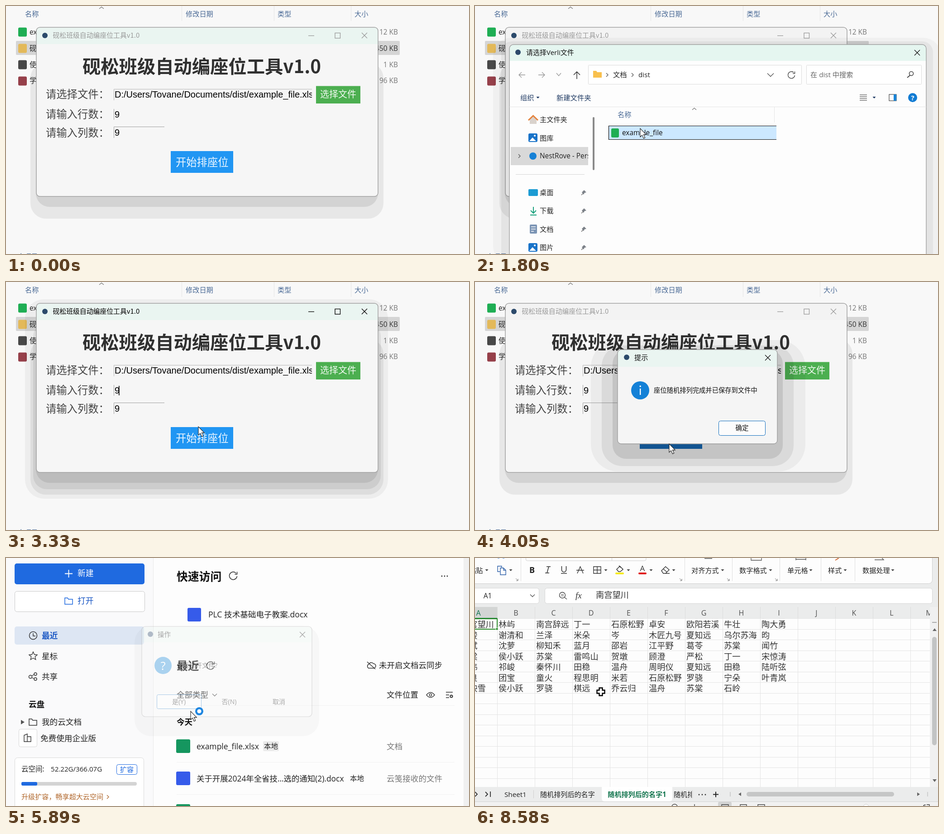
An HTML page that plays this animation: 1023 px wide and 547 px high, repeating every 8620 ms.

```html
<!DOCTYPE html>
<html lang="zh-CN">
<head>
<meta charset="utf-8">
<title>排座位演示</title>
<style>
html,body{margin:0;width:100%;height:100%;overflow:hidden;background:#f8f8f8}
#stage{display:block;width:100vw;height:100vh}
text{font-family:"Open Sans","Noto Sans CJK SC","Noto Sans CJK",sans-serif;white-space:pre}
.b{font-weight:700}
.cjk{font-family:"Noto Sans CJK SC","Noto Sans CJK",sans-serif}
.song{font-family:"Liberation Serif","Noto Sans CJK SC","Noto Sans CJK",serif;font-weight:300}
.arial{font-family:"Liberation Sans",Arial,sans-serif}
.mid{text-anchor:middle}
.end{text-anchor:end}
</style>
</head>
<body>
<svg id="stage" viewBox="0 0 1023 547" preserveAspectRatio="none"></svg>
<script>
const LOOP = 8620;
const APP = '砚松班级自动编座位工具v1.0';

// Drawing helpers, each returns markup
const rect = (x, y, w, h, fill, a = '') => `<rect x="${x}" y="${y}" width="${w}" height="${h}" fill="${fill}" ${a}/>`;
const text = (x, y, s, size = 15.2, fill = '#222', cls = '') => `<text x="${x}" y="${y}" font-size="${size}" fill="${fill}" class="${cls}">${s}</text>`;
const line = (d, c = '#444', w = 1.3, fill = 'none') => `<path d="${d}" stroke="${c}" stroke-width="${w}" fill="${fill}"/>`;
const dot = (x, y, r, fill, a = '') => `<circle cx="${x}" cy="${y}" r="${r}" fill="${fill}" ${a}/>`;
const group = (id, s) => `<g id="${id}">${s}</g>`;
const clip = (x, y, w, h, s) => `<svg x="${x}" y="${y}" width="${w}" height="${h}" viewBox="${x} ${y} ${w} ${h}">${s}</svg>`;
const box = (x, y, w, h, r, stroke, fill = '#fff') => rect(x + .5, y + .5, w - 1, h - 1, fill, `rx="${r}" stroke="${stroke}"`);
const drop = (x, y, c = '#444') => `<path d="M${x - 3.5} ${y - 2}h7l-3.5 4z" fill="${c}"/>`;
const chev = (x, y, w = 5, h = 3, c = '#555') => line(`M${x - w} ${y - h}L${x} ${y + h}L${x + w} ${y - h}`, c);
const next = (x, y, c = '#555') => line(`M${x - 2} ${y - 4}l4 4l-4 4`, c);
const cross = (x, y, c = '#111', r = 6) => line(`M${x - r} ${y - r}l${2 * r} ${2 * r}m0 ${-2 * r}l${-2 * r} ${2 * r}`, c);
const redo = (x, y, r, c = '#333') => line(`M${x + r * .7} ${y - r * .7}A${r} ${r} 0 1 0 ${x + r} ${y + 1}M${x + r} ${y - r}v${r * .6}h${-r * .6}`, c, 1.6);
const shade = (x, y, w, h, r, a) => rect(x, y, w, h, '#000', `rx="${r}" opacity="${a}"`);
const folder = (x, y, c) => line(`M${x} ${y}h6l2 3h9v11h-17z`, c, 1.5);
const each = (list, f) => list.map(f).join('');
const range = (n, f) => Array.from({length: n}, (_, i) => f(i)).join('');

function explorer() {
  const head = '#4a6a96';
  const icons = ['#1fae54', '#e3b95a', '#484848', '#96404a'];
  const names = ['example_file', '砚松', '使用说明', '学生'];
  const sizes = ['12 KB', '450 KB', '1 KB', '96 KB'];
  return rect(0, 0, 1023, 547, '#f8f8f8') +
    each([[42, '名称'], [397, '修改日期'], [600, '类型'], [770, '大小']], ([x, s]) => text(x, 23, s, 15.2, head)) +
    each([388, 592, 762], x => rect(x, 0, 1, 33, '#e4e4e4')) +
    line('M206 6l5-4l5 4', '#777') +
    rect(22, 77, 848, 31, '#d5d5d5', 'rx="2"') +
    range(4, i => rect(27, 47.5 + 36 * i, 19, 20, icons[i], 'rx="3"') +
      text(52, 63 + 35.8 * i, names[i], 15.4) +
      text(866, 63 + 35.8 * i, sizes[i], 15.4, i == 1 ? '#333' : '#777', 'end')) +
    text(13, 558, '4 个项目', 15, head);
}

const controls = c => line('M668 65.5h13', c) + rect(727, 59.5, 11.5, 11.5, 'none', `stroke="${c}" stroke-width="1.3"`) + cross(792, 65, c);

function mainWindow() {
  const cap = c => text(103.5, 70, APP, 14.85, c, 'cjk') + controls(c);
  const top = 'M67.5 84V55a8 8 0 0 1 8-8H814a8 8 0 0 1 8 8V84z';
  const label = (y, s) => text(88, y, s, 23.3, '#444', 'song');
  return shade(54, 125, 780, 344, 34, .07) + shade(66, 300, 756, 143, 30, .085) +
    group('glow', shade(42, 38, 802, 440, 42, .045) + shade(60, 90, 768, 367, 30, .07)) +
    rect(67, 47, 755, 373, '#f6f6f6', 'rx="8"') +
    `<path d="${top}" fill="#f3f3f3"/>` +
    group('mint', `<path d="${top}" fill="#eaf5f1"/>`) +
    cap('#999') + group('ink', cap('#111')) +
    dot(86, 65, 6, '#2c4a6b') +
    rect(67, 47, 755, 373, 'none', 'rx="8" stroke="#a3a3a3" stroke-width="1.5"') +
    text(169, 148, APP, 40.3, '#303030', 'b cjk') +
    label(203, '请选择文件：') + label(247, '请输入行数：') + label(288, '请输入列数：') +
    line('M238.5 208V183.5H676', '#b5b5b5', 1) + line('M238.5 251V227', '#a0a0a0', 1) + line('M238.5 291V266.5H350', '#a0a0a0', 1) +
    clip(238, 184, 438, 24, text(240, 202, 'D:/Users/Tovane/Documents/dist/example_file.xlsx', 20, '#000', 'arial')) +
    text(240, 246, '9', 20, '#000', 'arial') + text(240, 286, '9', 20, '#000', 'arial') +
    group('caret', rect(249, 229, 1.6, 21, '#000')) +
    rect(685, 176.5, 98, 38.5, '#4caf50') + text(694, 202, '选择文件', 20, '#f3faf3', 'song') +
    rect(364, 320, 138, 48, '#2196f3') + group('pressed', rect(364, 320, 138, 48, '#1769b5')) +
    text(375, 353, '开始排座位', 23.3, '#eef7ff', 'song');
}

function fileDialog() {
  const pic = (x, y) => rect(x, y, 20, 19, '#1873c9', 'rx="3"') + `<path d="M${x + 2} ${y + 17}l7-8l8 8z" fill="#fff"/>` + dot(x + 14, y + 5, 2, '#fff');
  const pin = y => line(`M235 ${y + 5}l4-4`, '#777', 1.5) + `<path d="M236 ${y - 1}l5-5l5 5l-4 1l-2 4z" fill="#7b8087"/>`;
  const nav = '#1f3a63';
  const places = ['桌面', '下载', '文档', '图片'];
  return shade(40, 70, 990, 500, 40, .03) + shade(58, 78, 954, 500, 24, .05) +
    rect(76, 85, 921, 480, '#fdfdfd', 'rx="9"') +
    '<path d="M76 121V94a9 9 0 0 1 9-9H988a9 9 0 0 1 9 9V121z" fill="#e5f6f0"/>' +
    rect(76, 85, 921, 480, 'none', 'rx="9" stroke="#a0a0a0" stroke-width="1.4"') +
    dot(95, 102, 6, '#2c4a6b') + text(113, 108, '请选择Verli文件', 15, '#111') + cross(977, 103) +
    line('M111 152H97m6-6l-6 6l6 6M140 152h14m-6-6l6 6l-6 6', '#999') + chev(185, 151, 5, 3, '#999') +
    line('M225 161V145m-7 7l7-7l7 7', '#333', 1.5) +
    box(250, 130, 472, 43, 1, '#dadada') + box(732, 130, 255, 43, 1, '#dadada') +
    '<path d="M261 143h7l2 3h10v12h-19z" fill="#f8c04e"/>' + next(292, 152) + text(305, 157, '文档') + next(348, 152) + text(361, 157, 'dist') +
    chev(653, 152, 7, 3.5) + redo(699, 152, 7.5, '#555') + text(741, 157, '在 dist 中搜索', 15.2, '#666') +
    dot(964, 149, 4.5, 'none', 'stroke="#444" stroke-width="1.6"') + line('M961 153l-6 5', '#444', 1.8) +
    text(100, 208, '组织', 15.2, nav) + drop(139, 202, nav) + text(180, 208, '新建文件夹', 15.3, nav) +
    line('M850 196h16m-16 4h16m-16 4h16m-16 4h16', '#333', 1.2) + drop(882, 202, nav) +
    rect(915, 195, 16, 14, '#fff', 'stroke="#222"') + rect(925, 195, 6, 14, '#1b86d8') +
    dot(967, 202, 10, '#107bd3') + text(967, 207.5, '?', 15, '#fff', 'mid b') +
    rect(76, 222, 921, 1, '#e6e6e6') +
    '<path d="M121 250v10h15v-10l-8-7z" fill="#d9d2cc"/>' + line('M118 252l10.5-10l10.5 10', '#e5823c', 3) + text(143, 256, '主文件夹') +
    pic(118, 281) + text(143, 297, '图库') +
    rect(79, 311, 171, 40, '#d9d9d9') + next(98, 331) + dot(128, 331, 8, '#1681d6') +
    clip(143, 311, 107, 40, text(143, 336, 'NestRove - Personal', 15.4)) +
    rect(260, 245, 4, 117, '#8a8a8a', 'rx="2"') + rect(90, 371, 152, 1, '#d5d5d5') +
    rect(118, 404, 21, 15, '#1c9bd3', 'rx="2"') + line('M129 443v14m-6-6l6 6l6-6M122 461h14', '#18a07c', 2) +
    rect(121, 482, 16, 20, '#7c95b5', 'rx="2"') + line('M124 487h10m-10 5h10m-10 5h6', '#fff', 1.5) + pic(118, 523) +
    each(places, (s, i) => text(143, 417 + 40.4 * i, s) + pin(412 + 40.3 * i)) +
    text(315, 245, '名称', 15.2, '#4a6a96') + line('M480 229l4.5-4l4.5 4', '#777') + rect(661, 223, 1, 34, '#e4e4e4') +
    group('picked', rect(295, 264, 371, 31, '#cce8ff') + line('M666 264.5H295.5V294.5H666', '#111', 1.2)) +
    rect(301, 270, 17, 20, '#1fae54', 'rx="3"') + text(325, 285, 'example_file', 15.4, '#111');
}

function messageBox() {
  return shade(256, 128, 474, 290, 60, .045) + shade(280, 140, 424, 266, 45, .07) + shade(304, 150, 376, 240, 30, .1) +
    rect(315, 149, 353, 208, '#f5f5f5', 'rx="8"') +
    '<path d="M315 187V157a8 8 0 0 1 8-8H660a8 8 0 0 1 8 8V187z" fill="#eaf5f1"/>' +
    rect(315, 149, 353, 208, 'none', 'rx="8" stroke="#9b9b9b" stroke-width="1.3"') +
    dot(335, 166, 6, '#2c4a6b') + text(352, 172, '提示', 15.2, '#111') + cross(647, 167) +
    dot(365, 239, 20, '#1481d7') + rect(364, 235, 2.4, 14, '#fff') + dot(365.2, 230, 1.8, '#fff') +
    text(395, 244, '座位随机排列完成并已保存到文件中', 14.3, '#111') +
    box(538, 306, 104, 33, 4, '#0f6cbd', '#fcfcfc') + text(590, 327, '确定', 14.5, '#111', 'mid');
}

function askBox() {
  return shade(284, 150, 408, 243, 36, .07) +
    rect(300, 151, 376, 199, '#f7f7f7', 'rx="8" stroke="#9b9b9b" stroke-width="1.2"') +
    '<path d="M301 186V159a8 8 0 0 1 8-7H667a8 8 0 0 1 8 7V186z" fill="#eaf5f1"/>' +
    dot(319, 168, 6, '#2c4a6b') + text(335, 174, '操作', 14.6, '#111') + cross(655, 169) +
    dot(347, 237, 19, '#1786d8') + text(347, 247, '?', 26, '#fff', 'mid') +
    text(377, 242, '是否打开文件?', 14, '#111') +
    box(333, 301, 99, 32, 3, '#0f6cbd', '#fcfcfc') +
    each([[382, '是(Y)'], [493, '否(N)'], [603, '取消']], ([x, s]) => text(x, 322, s, 14, '#111', 'mid'));
}

function home() {
  const blue = '#1f6ae0', z = 17.6;
  return rect(0, 0, 1023, 547, '#fdfdfd') + rect(0, 0, 326, 547, '#fafafb') + rect(325, 0, 1, 547, '#e8e8e8') + rect(1011, 0, 12, 547, '#f0f0f0') +
    rect(19, 12, 287, 46, blue, 'rx="5"') + line('M130 34.5h17m-8.5-8.5v17', '#fff', 1.8) + text(158, 40, '新建', 17.8, '#fff') +
    box(19, 73, 288, 46, 5, '#c9c9c9') + folder(130, 88, blue) + text(158, 101, '打开', 17.8, '#1a57c4') +
    rect(19, 151, 286, 40, '#dde6f3', 'rx="5"') + dot(60, 171, 8.5, 'none', 'stroke="#333" stroke-width="1.5"') + line('M60 166v6h5', '#333', 1.5) +
    text(79, 178, '最近', 17.8, '#1a57c4', 'b') +
    line('M60 207l2.7 6l6.3 .6l-4.8 4.2l1.5 6.2l-5.7-3.3l-5.7 3.3l1.5-6.2l-4.8-4.2l6.3-.6z', '#333', 1.4) + text(79, 223, '星标', z) +
    each([[54, 262, 3.5], [65, 256, 3], [65, 267, 3]], a => dot(...a, 'none', 'stroke="#333" stroke-width="1.5"')) + line('M57 260l5-3m-5 7l5 2', '#333') + text(79, 268, '共享', z) +
    text(50, 329, '云盘', 17.6, '#111', 'b') +
    '<path d="M33 357l8 5l-8 5z" fill="#555"/>' + folder(51, 355, '#333') + text(79, 368, '我的云文档', z) +
    box(28, 377, 41, 40, 4, '#d6d6d6') + line('M40 405V391l7-3v17zM47 394h8v11h-8', '#333', 1.4) + text(76, 404, '免费使用企业版', z) +
    box(19, 440, 286, 130, 6, '#d9d9d9') + text(34, 471, '云空间:', 15.5) + text(99, 471, '52.22G/366.07G', 15.1) +
    box(244, 455, 46, 23, 4, blue) + text(267, 472, '扩容', 15.2, blue, 'mid') +
    rect(34, 494, 255, 8, '#d4d4d4', 'rx="4"') + rect(34, 494, 35, 8, blue, 'rx="3"') +
    text(34, 532, '升级扩容，畅享超大云空间', 15.1, '#b0662a') + next(225, 527, '#b0662a') +
    text(377, 50, '快速访问', 24.8, '#111', 'b') + redo(502, 39, 8.5) + each([963, 969, 975], x => dot(x, 40, 1.4, '#333')) +
    rect(401, 110, 30, 30, '#365bea', 'rx="3"') + text(447, 131, 'PLC 技术基础电子教案.docx', z) +
    text(377, 247, '最近', 24.8, '#111', 'b') + redo(452, 237, 8.5) +
    line('M801 243a5 5 0 0 1 1-9a6 6 0 0 1 10-1a5 5 0 0 1 0 10zM798 229l18 16', '#333', 1.5) + text(824, 243, '未开启文档云同步', 17.5) +
    text(377, 308, '全部类型', 17.5) + chev(461, 302, 5, 2.5) + text(841, 308, '文件位置', 17.5) +
    line('M929 302q9-11 18 0q-9 11-18 0z', '#333', 1.4) + dot(938, 302, 2.6, 'none', 'stroke="#333" stroke-width="1.4"') +
    line('M972 296h15m-15 6h7m-7 6h7', '#333', 1.5) + dot(984, 305, 2.6, 'none', 'stroke="#333" stroke-width="2"') +
    text(377, 368, '今天', 17.5, '#111', 'b') +
    each([325, 450, 521], y => rect(377, y, 614, 1, '#f1f1f1')) +
    rect(376, 400, 31, 30, '#15965f', 'rx="3"') + text(421, 422, 'example_file.xlsx', 17.5) +
    rect(568, 404, 35, 22, '#ebebeb', 'rx="3"') + text(570, 421, '本地', 15.5) + text(841, 422, '文档', z, '#777') +
    rect(376, 471, 31, 30, '#365bea', 'rx="3"') + text(421, 493, '关于开展2024年全省技…选的通知(2).docx', 17.4) +
    text(760, 492, '本地', 15.5) + text(841, 493, '云笺接收的文件', z, '#777') + rect(376, 543, 31, 20, '#15965f', 'rx="3"');
}

const ROW = 23.5, GREEN = '#12754e', INK = '#333';

// Ribbon, formula bar, scroll bars and status bar shared by both sheets
function chrome(cell, value, thumb) {
  const tools = [[478, '对齐方式', 547], [584, '数字格式', 653], [690, '单元格', 742], [780, '样式', 818], [856, '数据处理', 923]];
  return rect(0, 0, 1023, 547, '#ebecec') + box(-10, -10, 1021, 67, 8, '#cfcfcf', '#fdfdfd') +
    text(-13, 33, '粘贴') + drop(26, 27) + line('M55 30h-5V18h9v3M56 22h7l5 5v10H56zM63 22v5h5', '#2d5fa8', 1.4) + drop(79, 27) +
    each([101, 463, 568, 673, 764, 839], x => rect(x, 0, 1, 51, '#dedede')) +
    line('M112.5 0V3q0 3 3 3H374q4 0 4-3V0M302.5 0V6', '#cfcfcf', 1) +
    text(126, 33, 'B', 18, '#222', 'mid b') + line('M158 19h9m-4 0l-4 14m-4 0h9', '#333', 1.6) +
    line('M191.5 18v8a5 5 0 0 0 10 0v-8M190 34h13', '#333', 1.6) + line('M226 34l6.5-15l6.5 15M224 27h17', '#333', 1.4) +
    line('M262 19h16v15h-16zM270 19v15M262 26.5h16', '#333', 1.4) + drop(289, 27) +
    line('M313 25l7-7l7 7l-6 5h-4zM318 17l4 4', '#333', 1.5) + rect(310, 32, 19, 4, '#f5ea16', 'rx="2"') + drop(339, 27) +
    text(370, 29, 'A', 17, '#333', 'mid') + rect(361, 32, 18, 4, '#e01b1b', 'rx="2"') + drop(389, 27) +
    line('M412 28l9-9l8 7l-8 8h-5zM416 24l8 7M420 34h10', '#333', 1.4) + drop(439, 27) +
    each(tools, ([x, s, d]) => text(x, 33, s) + drop(d, 27)) +
    line('M507 1h17M610 0v5h23V0M709 5V0M731 5V0M709 3h22M883 4h20l-4-4', '#555', 1.3) + line('M796 5l8-5', '#d36b33', 2) + line('M50 0h4m7 0h4', '#3277d0', 1.5) +
    box(-10, 66, 152, 35, 5, '#d6d6d6') + text(28, 89, cell, 15.5, '#222', 'mid') + chev(127, 83, 5, 2.5) +
    box(154, 66, 857, 35, 5, '#d6d6d6') + dot(193, 82, 6.5, 'none', 'stroke="#444" stroke-width="1.4"') + line('M198 87l5 4M190 80.5h6m-6 3h6', '#444', 1.2) +
    '<text x="222" y="89" font-size="19" fill="#333" font-style="italic" class="song">fx</text>' + text(267, 88, value, 18.2, INK, 'song') +
    rect(0, 134, 1005, 371, '#fdfdfd') + rect(1005, 108, 18, 397, '#f0f0f0') +
    rect(1010, 141, 10, 2, '#aaa') + rect(1010, 174, 10, thumb, '#c3c4c4', 'rx="5"') +
    '<path d="M1011 161l4.500-6l4.500 6zM1011 488h9l-4.500 6z" fill="#666"/>';
}

const corners = () => each([93, 455, 560, 666], x => line(`M${x - 3} 45l5 5m0-4v4h-4`, '#777', 1));

function footer(thumb) {
  return line('M0 516l5 5l-5 5M23 516l5 5l-5 5M34 515v12', '#333', 1.8) +
    each([495, 502, 509], x => dot(x, 522, 1.4, '#333')) + line('M526 521.5h12m-6-6v12', '#222', 2) +
    line('M564 516v10M1000 516v10', '#bbb', 1.2) + '<path d="M588 517v8l-6-4zM977 517v8l6-4z" fill="#666"/>' +
    rect(600, 516, thumb, 10, '#c5c6c6', 'rx="5"') +
    rect(0, 537, 1023, 10, '#f1f1f1') + rect(0, 537, 1023, 1, '#d2d2d2') +
    rect(537, 538, 30, 12, '#d3d4d4', 'rx="3"') +
    line('M435 548a6 5 0 0 1 12 0M485 543v5M545 548v-4h15v4M586 548v-4h14v4M625 548v-4h15v4M990 548q3-5 6-3M998 544h6v4', '#444', 1.4) +
    dot(864, 549, 6, '#fff', 'stroke="#ccc"');
}

// Columns of equal width from x0, lettered from the given index; hot is the selected one
function grid(x0, step, first, hot) {
  const a = Math.round(x0 + step * (hot - first));
  const col = i => {
    const x = Math.round(x0 + step * i), k = first + i;
    return rect(x, 108, 1, 25, '#dcdcdc') + rect(x, 134, 1, 371, '#e4e4e4') +
      text(x + step / 2, 127, String.fromCharCode(65 + k), 16, k == hot ? GREEN : '#505050', 'mid');
  };
  return clip(0, 108, 1005, 397, rect(a, 108, step, 25, '#d3d5d4') + rect(a, 132, step, 2, '#2b8a4b') +
    range(13, col) + range(16, i => rect(0, 133 + Math.round(ROW * i), 1005, 1, '#e4e4e4')));
}

const activeTab = (x, w, s) => `<path d="M${x} 505h${w}v25q0 7-7 7h${14 - w}q-7 0-7-7z" fill="#fff"/>` + text(x + w / 2, 527, s, 15.1, GREEN, 'b mid');
const seps = list => each(list, x => rect(x, 512, 1, 18, '#cfcfcf'));

function roster() {
  const names = '柳知禾 石原松野 顾澄 苏棠 祁峻 林屿 米朵 方映雪 苏棠 叶青岚 邵岩 罗骁 贺墩 温舟 兰泽'.split(' ');
  const filter = x => box(x, 138, 19, 19, 1, '#bdbdbd') + drop(x + 9.5, 147.5, '#1ba26b');
  const cell = (x, i, s) => text(x, 153 + ROW * i, s, 18.2, INK, 'song mid');
  const cells = cell(7, 0, '学号') + cell(107, 0, '姓名') + each(names, (s, i) => cell(7, i + 1, i + 1) + cell(107, i + 1, s));
  return chrome('E18', '', 301) + grid(164, 80.5, 2, 4) +
    text(7, 127, 'A', 16, '#505050', 'mid') + text(107, 127, 'B', 16, '#505050', 'mid') +
    clip(0, 134, 1005, 371, cells) + filter(27) + filter(145) + activeTab(50, 58, '名单') +
    text(124, 527, 'Sheet1', 15.2) + text(203, 527, '随机排列后的名字', 15.1) + text(344, 527, '随机排列后的名字1', 15.1) +
    seps([188, 337, 479]) + footer(365);
}

function seating() {
  const rows = [
    '南宫望川 林屿 南宫辞远 丁一 石原松野 卓安 欧阳若溪 牛壮 陶大勇',
    '祁峻 谢清和 兰泽 米朵 岑 木匠九号 夏知远 乌尔苏海 昀',
    '唐斌 沈萝 柳知禾 蓝月 邵岩 江平野 葛苓 苏棠 闻竹',
    '苏棠 侯小跃 苏棠 雷鸣山 贺墩 顾澄 严松 丁一 宋惊涛',
    '贺玮 祁峻 秦怀川 田稳 温舟 周明仪 夏知远 田稳 陆听弦',
    '魏良 团宝 童火 程思明 米若 石原松野 罗骁 宁朵 叶青岚',
    '方映雪 侯小跃 罗骁 棋远 乔云归 温舟 苏棠 石岭'];
  const cells = each(rows, (row, j) => each(row.split(' '), (s, i) =>
    text(-31 + 83 * i, 153 + ROW * j, s, 18.2, INK, 'song')));
  return chrome('A1', '南宫望川', 239) + corners() + grid(-34, 83, 0, 0) + clip(0, 134, 1005, 371, cells) +
    rect(-5, 134, 54, 23, 'none', 'stroke="#2b8a2b" stroke-width="2"') + rect(46, 154, 5, 5, '#2b8a2b', 'stroke="#fff"') +
    activeTab(280, 156, '随机排列后的名字1') +
    text(65, 527, 'Sheet1', 15.2) + text(144, 527, '随机排列后的名字', 15.1) +
    clip(438, 508, 42, 28, text(439, 527, '随机排列后的名字2', 15.1)) +
    seps([129, 480]) + footer(326);
}

const stage = document.getElementById('stage');
stage.innerHTML = explorer() + mainWindow() + group('files', fileDialog()) + group('done', messageBox()) +
  group('home', home()) + group('ask', askBox()) + group('roster', roster()) + group('seats', seating()) +
  group('cursor',
    group('arrow', line('M0 0V18.5L4.3 14.8L7.5 22L10.7 20.6L7.5 13.6H13.2Z', '#222', 1.1, '#fff')) +
    group('plus', line('M-3.5-8.5H3.5V-3.5H8.5V3.5H3.5V8.5H-3.5V3.5H-8.5V-3.5H-3.5Z', '#000', 2.4, '#fff')) +
    group('busy', dot(19, 0, 6.8, '#fff', 'stroke="#1f86e0" stroke-width="4.5"')));

const el = id => document.getElementById(id);

// Opacity steps: time, value
const fades = {
  mint: [[0, 1], [940, 1], [1020, 0], [2040, 0], [2180, 1], [3600, 1], [3690, 0]],
  ink: [[40, 0], [240, 1], [940, 1], [1020, 0], [2040, 0], [2180, 1], [3600, 1], [3690, 0]],
  files: [[920, 0], [1080, 1], [1960, 1], [2160, 0]],
  done: [[3730, 0], [3900, 1], [4840, 1], [4980, 0]],
  ask: [[4990, 0], [5130, 1], [5680, 1], [5890, .36], [6100, 0]],
  home: [[5800, 0], [5880, 1]],
  roster: [[6400, 0], [6480, 1]]
};
const zooms = {
  files: [536, 400, [[920, .94], [1080, 1], [1960, 1], [2160, .94]]],
  done: [491, 253, [[3730, .93], [3900, 1], [4840, 1], [4980, .94]]],
  ask: [488, 250, [[4990, .99], [5130, 1.06], [5680, 1.06], [5890, 1], [6100, .98]]]
};
// Pointer stops: time, x, y
const route = [
  [40, 470, 560], [400, 600, 380], [800, 735, 200], [920, 735, 200], [1200, 800, 300], [1560, 873, 380], [1799, 873, 380],
  [1800, 365, 270], [2480, 365, 270], [2600, 250, 261], [2850, 250, 261], [2950, 254, 238], [3050, 254, 238],
  [3150, 302, 299], [3230, 345, 303], [3290, 397, 305], [3330, 425, 319], [3450, 425, 322], [3560, 429, 357],
  [4570, 429, 357], [4790, 590, 324], [4960, 590, 324], [5300, 395, 322], [5450, 395, 322], [5850, 408, 338],
  [6500, 408, 338], [6800, 376, 314], [6900, 376, 314], [7200, 400, 516], [7350, 400, 516], [7600, 350, 515],
  [8340, 350, 515], [8560, 278, 295]];

function at(steps, t, k = 1) {
  const i = steps.findIndex(s => s[0] > t);
  if (i < 0) return steps[steps.length - 1][k];
  if (i == 0) return steps[0][k];
  const a = steps[i - 1], b = steps[i];
  return a[k] + (b[k] - a[k]) * (t - a[0]) / (b[0] - a[0]);
}

function show(id, v) {
  el(id).style.opacity = v;
  el(id).style.visibility = v > 0 ? 'visible' : 'hidden';
}

function draw(t) {
  for (const id in fades) show(id, at(fades[id], t));
  show('glow', at(fades.ink, t));
  for (const id in zooms) {
    const [x, y, steps] = zooms[id];
    el(id).setAttribute('transform', `translate(${x} ${y}) scale(${at(steps, t)}) translate(${-x} ${-y})`);
  }
  show('picked', +(t >= 1800));
  show('caret', +(t >= 2960 && t < 3600));
  show('pressed', +(t >= 3570 && t < 4980));
  show('seats', +(t >= 7260));
  const x = at(route, t, 1), y = at(route, t, 2);
  const plus = t > 6920 && y < 505;
  el('cursor').setAttribute('transform', `translate(${x} ${y})`);
  show('arrow', +!plus);
  show('plus', +plus);
  show('busy', +(t >= 5500 && t < 6400));
}

const start = performance.now();
function tick() {
  draw((performance.now() - start) % LOOP);
  requestAnimationFrame(tick);
}
tick();
</script>
</body>
</html>
```
